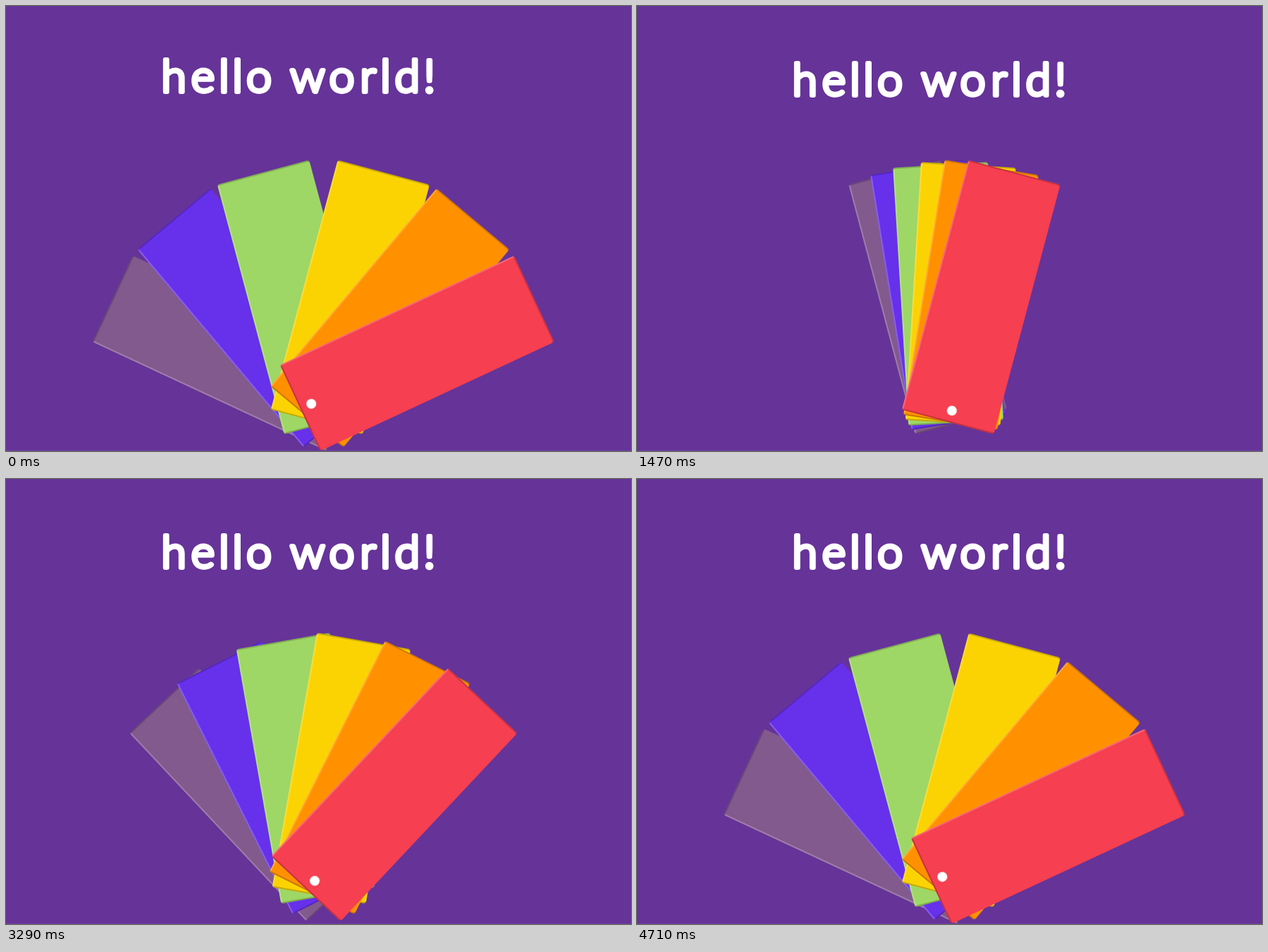
Recreate the animation shown at these times as an HTML page. Size 887 by 632 pixels, loop 4.73 s.

```html
<!DOCTYPE html>
<html lang="en">
<head>
<meta charset="utf-8">
<title>hello world!</title>
<style>
  html, body { margin: 0; width: 100%; height: 100%; overflow: hidden; background: #639; }
  #stage { position: relative; width: 887px; height: 632px; overflow: hidden; background: #639; }
  svg { position: absolute; left: 0; top: 0; }
  #title {
    font: 300 64px Lato, "Open Sans", sans-serif;
    text-anchor: middle;
    fill: #fff;
    stroke: #fff;
    stroke-width: 5.8px;
    stroke-linejoin: round;
    stroke-linecap: round;
  }
  .card {
    position: absolute;
    box-sizing: border-box;
    left: 383px;
    top: 225px;
    width: 135px;
    height: 367px;
    border: solid transparent;
    border-width: 2px 0 2px 2px;
    border-color: rgba(0, 0, 0, .18) transparent rgba(0, 0, 0, .2) rgba(255, 255, 255, .22);
    border-radius: 4px;
    background-clip: border-box;
    transform-origin: 50% 90%;
  }
  .pin {
    position: absolute;
    left: 60px;
    top: 340.5px;
    width: 14px;
    height: 14px;
    border-radius: 50%;
    background: #fff;
  }
  #edge { position: absolute; left: 0; top: 631px; width: 887px; height: 1px; background: #6e4299; }
</style>
</head>
<body>
<div id="stage">
  <svg width="887" height="200">
    <text id="title" y="126.7" x="238 279.5 309.3 328.5 359.2 391 428 476.5 513.7 538.5 569.3 601">hello world!</text>
  </svg>
  <div id="fan"></div>
  <div id="edge"></div>
</div>
<script>
  const LOOP = 4730;
  const BOUNCE = 1712;
  const BOUNCE_LEAD = 163;

  // back to front: colour and open angle
  const cards = [
    ['#825a8e', -65],
    ['#6730eb', -40],
    ['#9ed765', -15],
    ['#fbd303', 15],
    ['#ff9100', 40],
    ['#f63f50', 65]
  ];

  // time in ms and how far the fan is open
  const fanSteps = [[0, 1], [1086, 1], [1906, 0], [2973, 0], [3793, 1], [LOOP, 1]];

  const fan = document.getElementById('fan');

  function paused(el, frames, duration) {
    const anim = el.animate(frames, { duration, iterations: Infinity });
    anim.pause();
    return anim;
  }

  const fanAnims = cards.map(([color, angle]) => {
    const card = document.createElement('div');
    card.className = 'card';
    card.style.backgroundColor = color;
    fan.append(card);
    const frames = fanSteps.map(([time, open]) => ({
      offset: time / LOOP,
      transform: `rotate(${angle * open}deg)`,
      easing: 'ease'
    }));
    return paused(card, frames, LOOP);
  });

  const pin = document.createElement('div');
  pin.className = 'pin';
  fan.lastChild.append(pin);

  const bounce = paused(document.getElementById('title'), [0, -17.8, 0].map(y => ({
    transform: `translateY(${y}px)`,
    easing: 'ease'
  })), BOUNCE);

  const start = performance.now();

  function draw() {
    const t = (performance.now() - start) % LOOP;
    for (const anim of fanAnims) anim.currentTime = t;
    bounce.currentTime = t + BOUNCE_LEAD;
    requestAnimationFrame(draw);
  }
  draw();
</script>
</body>
</html>
```
